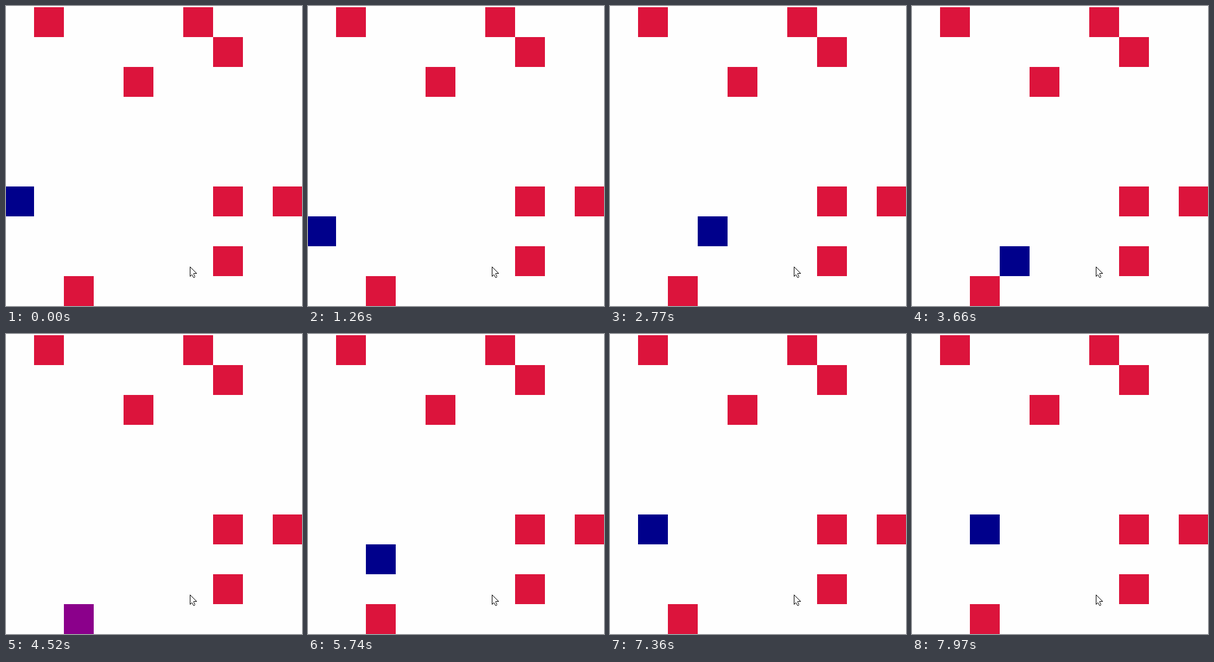
An HTML page with a canvas for the animation above (8 s loop, 496 by 502 pixels).

```html
<!DOCTYPE html>
<html lang="en">
<head>
<meta charset="utf-8">
<title>Grid walk</title>
<style>
  html, body { margin: 0; height: 100%; overflow: hidden; background: #fefefe; }
  canvas { display: block; }
</style>
</head>
<body>
<canvas id="stage" width="496" height="502"></canvas>
<script>
const CELL = 50, LEFT = -3, TOP = 2, LAST = 9;
const LOOP = 8000, FIRST = 206, STEP = 507;
const START = { col: 0, row: 6 };

// Compass moves of the walker; a move off the grid leaves it in place.
const MOVES = 'W W S E E E S W S NW NE W NE S NW E'.split(' ');
// Obstacles as column and row digits.
const BLOCKS = '10 60 71 42 76 96 78 29'.split(' ');

const ctx = document.getElementById('stage').getContext('2d');
const cursor = new Path2D('M.5 .5V16.5L3.5 13.5L6.5 18.5H7.5L8.5 16.5L6.5 12.5V11.5H11.5Z');

const clamp = n => Math.max(0, Math.min(LAST, n));

function walk({ col, row }, move) {
  const dx = move.includes('E') - move.includes('W');
  const dy = move.includes('S') - move.includes('N');
  return { col: clamp(col + dx), row: clamp(row + dy) };
}

function fillCell(col, row, color) {
  ctx.fillStyle = color;
  ctx.fillRect(LEFT + col * CELL, TOP + row * CELL, CELL, CELL);
}

function drawCursor(x, y) {
  ctx.save();
  ctx.translate(x, y);
  ctx.fillStyle = '#fff';
  ctx.fill(cursor);
  ctx.strokeStyle = '#000';
  ctx.stroke(cursor);
  ctx.restore();
}

function draw() {
  const t = performance.now() % LOOP;
  const steps = Math.max(0, Math.floor((t - FIRST) / STEP) + 1);
  const { col, row } = MOVES.slice(0, steps).reduce(walk, START);
  const hit = BLOCKS.includes(`${col}${row}`);

  ctx.fillStyle = '#fefefe';
  ctx.fillRect(0, 0, 496, 502);
  for (const [c, r] of BLOCKS) fillCell(+c, +r, 'crimson');
  fillCell(col, row, hit ? 'darkmagenta' : 'darkblue');
  drawCursor(308, 436);
  requestAnimationFrame(draw);
}
draw();
</script>
</body>
</html>
```
